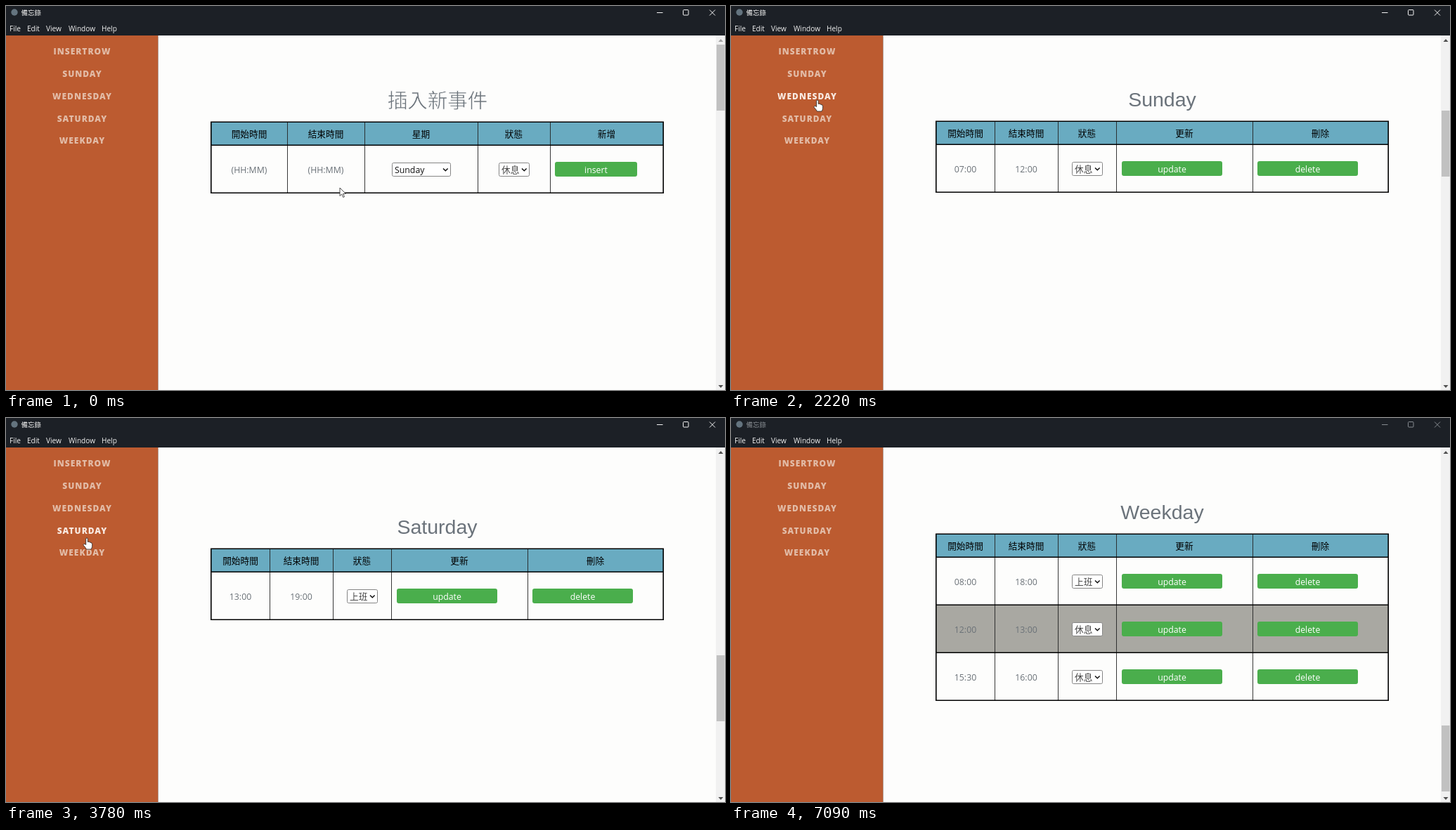
An HTML page that plays this animation: 1023 by 547 pixels, repeating every 7130 ms.

```html
<!DOCTYPE html>
<html lang="zh-Hant">
<head>
<meta charset="utf-8">
<style>
html, body { margin: 0; width: 100%; height: 100%; overflow: hidden; background: #1c2026; }
svg { display: block; }
text { font-family: "Open Sans", "Noto Sans CJK TC", "Noto Sans", sans-serif; font-size: 12.3px; }
.mid { text-anchor: middle; }
.cjk { font-family: "Noto Sans CJK TC", "Noto Sans CJK JP", sans-serif; font-size: 12.7px; }
.head { font-weight: 500; }
.title { font-family: "Liberation Sans", Arial, sans-serif; font-size: 28.5px; fill: #6b737b; }
/* a page-coloured outline thins the strokes to a light weight */
.title.cjk { font-family: "Noto Sans CJK TC", "Noto Sans CJK JP", sans-serif; font-weight: 100; stroke: #fdfdfc; stroke-width: .6px; }
.menu { font-size: 10.1px; fill: #f1f1f1; }
.link { font-weight: 800; font-size: 12px; letter-spacing: 1px; }
.value { fill: #6b7278; }
.button { fill: #fff; }
</style>
</head>
<body>
<svg id="stage" width="1023" height="547" viewBox="0 0 1023 547"></svg>
<script>
const LOOP = 7130;
const LINKS = ['INSERTROW', 'SUNDAY', 'WEDNESDAY', 'SATURDAY', 'WEEKDAY'];
const SECTION_TOPS = [0, 513, 1037, 1561, 2085];
const SCROLL_STARTS = [712, 2204, 3351, 4907];
const SCROLL_TIME = 500;
const BLUR_TIME = 7085;

// time, x, y of the pointer tip
const POINTER = [
  [80, 475, 259], [640, 127, 90], [1270, 127, 90], [1620, 123, 134],
  [2720, 123, 134], [3030, 116, 170], [3500, 116, 170], [3700, 115, 171],
  [4250, 115, 171], [4720, 127, 195], [5600, 127, 195], [6320, 470, 185], [7050, 745, 560]
];

const text = (x, y, s, cls = '', attrs = '') => `<text x="${x}" y="${y}" class="${cls}" ${attrs}>${s}</text>`;
const rect = (x, y, w, h, fill, attrs = '') => `<rect x="${x}" y="${y}" width="${w}" height="${h}" fill="${fill}" ${attrs}/>`;
const path = (d, attrs) => `<path d="${d}" ${attrs}/>`;

const button = (x, y, w, label) =>
  rect(x, y - 12, w, 21, '#4aae4c', 'rx="3"') + text(x + w / 2, y + 4, label, 'mid button');

const select = (x, y, w, label, cls) =>
  rect(x + .5, y - 10.5, w - 1, 19, '#fff', 'rx="2" stroke="#858585"') +
  text(x + 4, y + 4, label, cls, `fill="${cls ? '#444' : '#111'}"`) +
  path(`M${x + w - 11} ${y - 2.5}l3.3 3.3 3.3-3.3`, 'fill="none" stroke="#111" stroke-width="1.5"');

function table(edges, heads, rows) {
  const bottom = 198 + 68 * rows.length;
  const centre = i => (edges[i] + edges[i + 1]) / 2;
  let out = rect(292, 165, 643, 33, '#69abc1');
  heads.forEach((h, i) => out += text(centre(i), 187, h, 'mid cjk head'));
  rows.forEach((row, r) => {
    const y = 234 + 68 * r;
    if (r % 2) out += rect(292, y - 36, 643, 68, '#a9a8a2');
    row.slice(0, 2).forEach((v, i) => out += text(centre(i), y + 4, v, 'mid value'));
    out += row[2](y);
  });
  for (const x of edges.slice(1, -1)) out += path(`M${x + .5} 165V${bottom}`, 'stroke="#222" stroke-width=".9"');
  let rules = `M291.800 165.200H935.200V${bottom + .2}H291.800Z`;
  for (let y = 198.2; y < bottom; y += 68) rules += `M292 ${y}H935`;
  return out + path(rules, 'fill="none" stroke="#000" stroke-width="1.6"');
}

const insertControls = y =>
  select(549, y, 84, 'Sunday', '') + select(701, y, 44, '休息', 'cjk') + button(781, y, 117, 'insert');
const rowControls = status => y =>
  select(485, y, 44, status, 'cjk') + button(556, y, 143, 'update') + button(749, y, 143, 'delete');

const dayTable = rows => table([292, 375, 465, 548, 742, 935],
  ['開始時間', '結束時間', '狀態', '更新', '刪除'],
  rows.map(([from, to, status]) => [from, to, rowControls(status)]));

const sections = [
  text(614, 145, '插入新事件', 'mid title cjk') +
    table([292, 400, 510, 671, 774, 935], ['開始時間', '結束時間', '星期', '狀態', '新增'],
      [['(HH:MM)', '(HH:MM)', insertControls]]),
  ...[
    ['Sunday', [['07:00', '12:00', '休息']]],
    ['Wednesday', [['09:00', '14:00', '上班']]],
    ['Saturday', [['13:00', '19:00', '上班']]],
    ['Weekday', [['08:00', '18:00', '上班'], ['12:00', '13:00', '休息'], ['15:30', '16:00', '休息']]]
  ].map(([name, rows]) => text(613.5, 144, name, 'mid title') + dayTable(rows))
];

const menu = [['File', 5], ['Edit', 30], ['View', 57], ['Window', 89], ['Help', 136]];

stage.innerHTML =
  rect(0, 0, 1023, 42, '#1c2026') +
  '<circle cx="12" cy="9" r="4.7" fill="#64747f"/>' +
  `<g id="caption">${text(21.5, 12.7, '備忘錄', 'cjk', 'style="font-size:9.5px" fill="currentColor"')}` +
  path('M926 9.5h8.5M963.5 6.5q0-1 1-1h5.500q1 0 1 1v5.500q0 1-1 1h-5.500q-1 0-1-1zM1001 5.500l8 8m0-8l-8 8',
    'fill="none" stroke="currentColor"') + '</g>' +
  menu.map(([s, x]) => text(x, 35.5, s, 'menu')).join('') +
  rect(0, 42, 216.5, 505, '#bc5b30') +
  LINKS.map((s, i) => text(108.5, 69.2 + 31.8 * i, s, 'mid link')).join('') +
  '<svg x="216.5" y="42" width="793.5" height="505" viewBox="216.5 42 793.5 505">' +
  rect(216, 42, 794, 505, '#fdfdfc') +
  `<g id="page">${sections.map((s, i) => `<g transform="translate(0 ${SECTION_TOPS[i]})">${s}</g>`).join('')}</g></svg>` +
  rect(1010, 42, 13, 505, '#f1f1f1') +
  rect(1011, 55, 11.5, 94, '#c1c1c1', 'id="thumb"') +
  path('M1013.500 51h7l-3.500-4z', 'id="up"') +
  path('M1013.500 540h7l-3.500 4z', 'fill="#505050"') +
  '<g id="pointer" fill="#fff" stroke="#222" stroke-width=".8" stroke-linejoin="round">' +
  path('M0 0V11.500L2.700 9 4.700 13.500 6.500 12.700 4.600 8.400H8.300Z', 'id="arrow"') +
  path('M-1.300 9.500V1.200Q-1.300 0 0 0T1.300 1.200V5.500Q3.400 4.600 3.900 6.100 5.700 5.500 6 7 7.600 6.700 7.600 8.300V11.500Q7.400 14 6 16H-.5Q-2 13.200-4.600 10.600-5.400 9.300-4.200 8.600-3 8.200-1.300 9.500Z', 'id="hand"') +
  '</g>';

const byId = id => document.getElementById(id);
const [caption, page, thumb, up, pointer, arrow, hand] =
  ['caption', 'page', 'thumb', 'up', 'pointer', 'arrow', 'hand'].map(byId);
const links = [...document.querySelectorAll('.link')];
const clamp = v => Math.min(1, Math.max(0, v));
const smooth = u => u * u * (3 - 2 * u);

// cubic-bezier(.42, 0, .58, 1)
function easeInOut(p) {
  let low = 0, high = 1;
  for (let i = 0; i < 20; i++) {
    const u = (low + high) / 2, v = 1 - u;
    if (1.26 * u * v * v + 1.74 * u * u * v + u ** 3 < p) low = u; else high = u;
  }
  return p <= 0 ? 0 : p >= 1 ? 1 : smooth(low);
}

const scrollAt = t => SCROLL_STARTS.reduce((sum, start, i) =>
  sum + (SECTION_TOPS[i + 1] - SECTION_TOPS[i]) * easeInOut((t - start) / SCROLL_TIME), 0);

function pointerAt(t) {
  let [, x, y] = POINTER[0];
  for (let i = 1; i < POINTER.length; i++) {
    const [t0, x0, y0] = POINTER[i - 1], [t1, x1, y1] = POINTER[i];
    const k = smooth(clamp((t - t0) / (t1 - t0)));
    x += (x1 - x0) * k;
    y += (y1 - y0) * k;
  }
  return [x, y];
}

function draw(t) {
  const scroll = Math.round(scrollAt(t));
  page.setAttribute('transform', `translate(0 ${-scroll})`);
  thumb.setAttribute('y', Math.round(55 + scroll * .1838));
  up.setAttribute('fill', scroll ? '#505050' : '#a3a3a3');
  caption.style.color = t < BLUR_TIME ? '#f4f4f4' : '#868b90';

  const [x, y] = pointerAt(t);
  const hovered = x < 216 ? Math.floor((y - 49) / 31.8) : -1;
  links.forEach((link, i) => link.setAttribute('fill', i === hovered ? '#f8e8df' : '#e2bba6'));
  const onLink = hovered >= 0 && hovered < LINKS.length;
  pointer.setAttribute('transform', `translate(${x} ${y})`);
  arrow.style.display = onLink ? 'none' : '';
  hand.style.display = onLink ? '' : 'none';
}

const begin = performance.now();
function tick() {
  draw((performance.now() - begin) % LOOP);
  requestAnimationFrame(tick);
}
tick();
</script>
</body>
</html>
```
